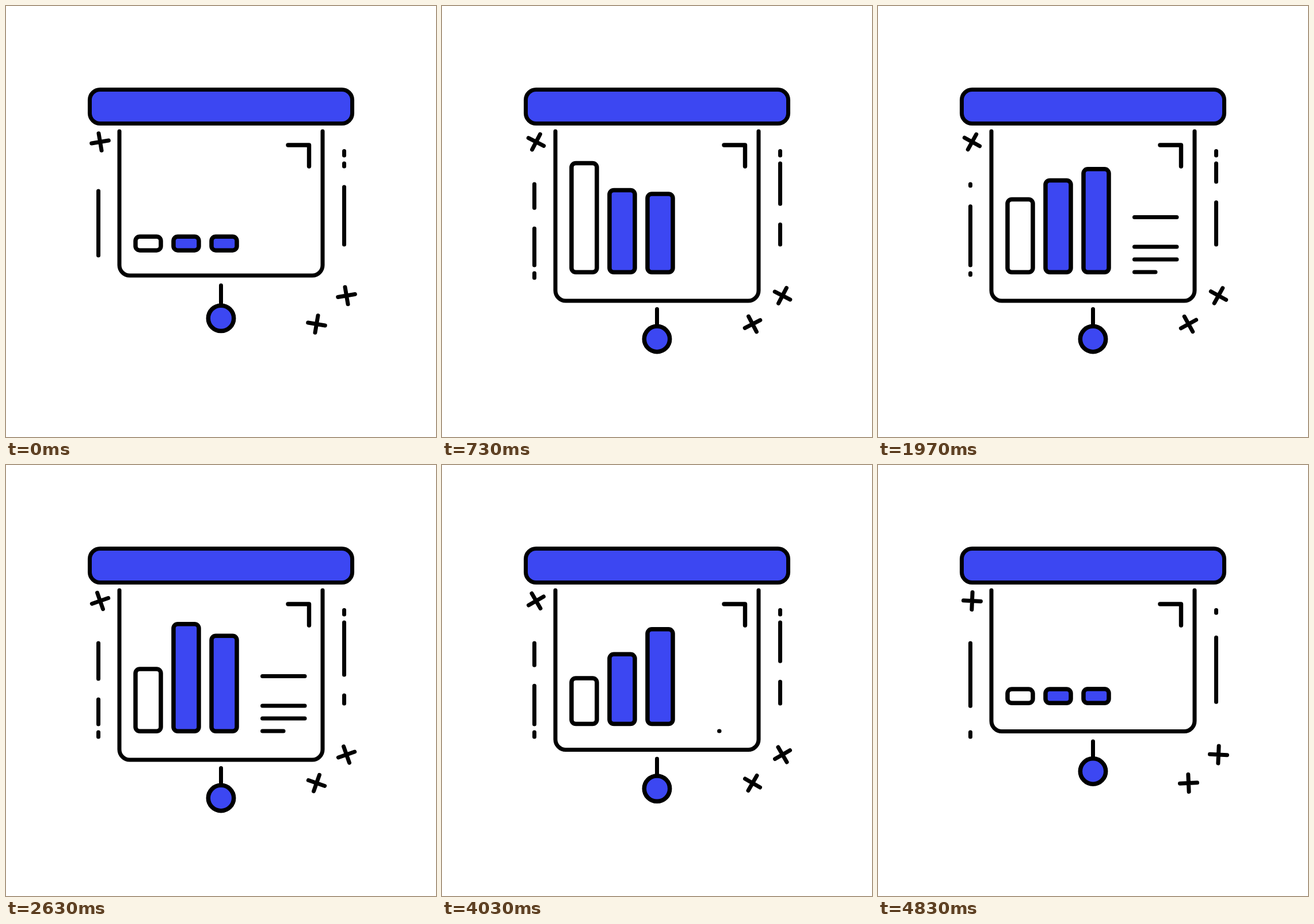
Write an HTML page that moves like this. It is 747 px wide and 750 px high and loops after 4860 ms.

```html
<!DOCTYPE html>
<html lang="en">
<head>
<meta charset="utf-8">
<title>Presentation chart</title>
<style>
  html, body { margin: 0; width: 100%; height: 100%; overflow: hidden; background: #fff; }
  svg { display: block; width: 100%; height: 100%; }
</style>
</head>
<body>
<svg id="stage" viewBox="0 0 747 750" fill="none" stroke="#000" stroke-width="7"
     stroke-linecap="round" stroke-linejoin="round"></svg>
<script>
const LOOP = 4860, FPS = 30, FIRST = 4;
const BLUE = '#3c47f2';
const DASH = 112, GAP = 36, PERIOD = DASH + GAP;
const stage = document.getElementById('stage');

function add(tag, attrs) {
  const el = document.createElementNS('http://www.w3.org/2000/svg', tag);
  set(el, attrs);
  return stage.appendChild(el);
}
function set(el, attrs) {
  for (const k in attrs) el.setAttribute(k, attrs[k]);
}

// Eased value at time t through [time, value] keys
function track(t, keys) {
  if (t <= keys[0][0]) return keys[0][1];
  for (let i = 1; i < keys.length; i++) {
    const [t0, a] = keys[i - 1], [t1, b] = keys[i];
    if (t < t1) {
      const u = (t - t0) / (t1 - t0);
      return a + (b - a) * u * u * (3 - 2 * u);
    }
  }
  return keys[keys.length - 1][1];
}

// Vertical offset: drop with overshoot, rest, pull back up
const drop = (t, dist, start, end) =>
  track(t, [[start, -dist], [15, 12.8], [20, 0], [115, 0], [end, -dist]]);

add('rect', { x: 145.5, y: 145.5, width: 456, height: 59, rx: 18, fill: BLUE });
add('path', { d: 'M490 242H526.5V279', 'stroke-width': 7.4 });
const panel = add('path', {});
const rod = add('path', {});
const ball = add('circle', { cx: 373.5, r: 22.2, fill: BLUE, 'stroke-width': 7.5 });

const bars = [
  { x: 225, fill: '#fff', h: [190, 139, 116, 84] },
  { x: 291, fill: BLUE, h: [143, 109, 205, 129] },
  { x: 357, fill: BLUE, h: [136, 198, 163, 176] }
].map(({ x, fill, h }) => ({
  el: add('rect', { x, width: 44, rx: 7.5, fill, 'stroke-width': 7.5 }),
  keys: [[5, 24], ...h.map((v, i) => [25 * (i + 1), v]), [120, h[3]], [150, 24]]
}));

const lines = [[367.5, 519], [419, 519], [441, 519], [463, 482]].map(([y, end], i) => ({
  el: add('path', {}), y, end, start: 33 + 2 * i, leave: 105 + 2 * i
}));

// gap: where the break in the dashes starts at time zero
const dashes = [
  { x: 160.5, top: 310, bottom: 451, gap: 274.2 },
  { x: 160.5, top: 465, bottom: 473, gap: 281.2 },
  { x: 587.5, top: 274, bottom: 415, gap: 267.2 },
  { x: 587.5, top: 252.5, bottom: 260, gap: 260.2 }
].map(d => ({
  ...d,
  el: add('path', { d: `M${d.x} ${d.top}V${d.bottom}`, 'stroke-dasharray': `${DASH} ${GAP}` })
}));

const crosses = [[163.5, 236.5, -1], [591.5, 504, -1], [539.5, 553.5, 1]].map(([x, y, dir]) => ({
  el: add('path', { d: 'M-15 0H15M0-15V15' }), x, y, dir
}));

function draw(ms) {
  const t = FIRST + Math.floor((ms % LOOP + 3.4) * FPS / 1000);

  const bottom = 513 + drop(t, 49.5, 1.5, 140);
  set(panel, { d: `M197 218V${bottom - 18}a18 18 0 0 0 18 18H532a18 18 0 0 0 18-18V218` });
  const cy = 579.5 + drop(t, 46.5, 0, 140);
  set(ball, { cy });
  set(rod, { d: `M373.5 ${527.5 + drop(t, 46.5, 1.5, 140)}V${cy - 23}` });

  const base = 463.3 + drop(t, 49, 0, 145);
  for (const b of bars) {
    const height = track(t, b.keys);
    set(b.el, { y: base - height, height });
  }

  for (const l of lines) {
    const x0 = track(t, [[l.leave, 445.5], [l.leave + 15, l.end]]);
    const x1 = track(t, [[l.start, 445.5], [l.start + 15, l.end]]);
    set(l.el, { d: x1 > x0 ? `M${x0} ${l.y}H${x1}` : '' });
  }

  const shift = t * PERIOD * 3 / 150;
  for (const d of dashes) {
    const offset = DASH - (d.gap + shift - d.top);
    set(d.el, { 'stroke-dashoffset': (offset % PERIOD + PERIOD) % PERIOD });
  }

  for (const c of crosses) {
    set(c.el, { transform: `translate(${c.x} ${c.y}) rotate(${c.dir * 2.4 * t})` });
  }
}

const began = performance.now();
function tick() {
  draw(performance.now() - began);
  requestAnimationFrame(tick);
}
draw(0);
requestAnimationFrame(tick);
</script>
</body>
</html>
```
